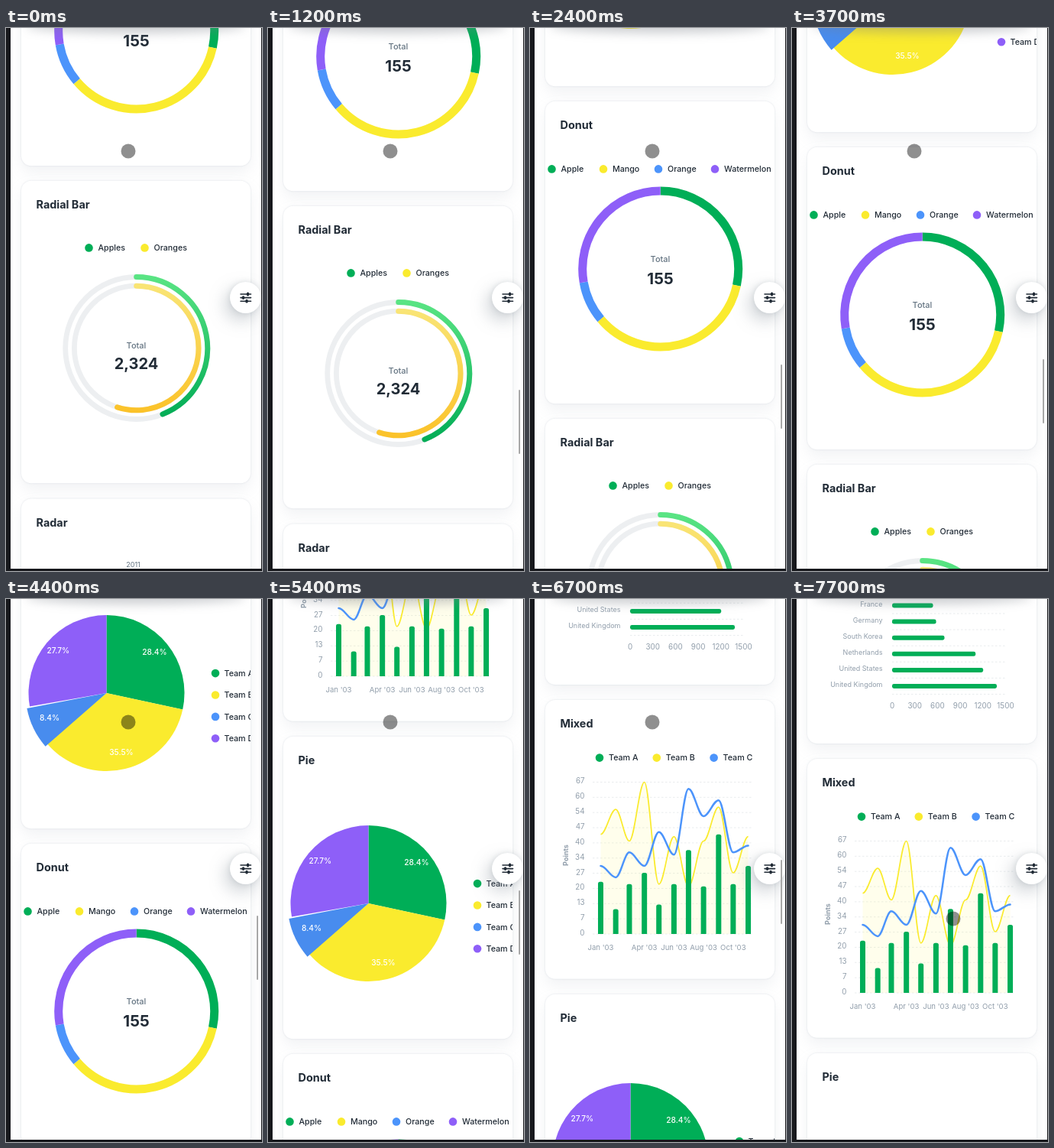
These frames come from a looping animation (335 by 710 pixels, 8000 ms). An HTML page:

```html
<!DOCTYPE html>
<html lang="en">
<head>
<meta charset="utf-8">
<title>Charts</title>
<style>
html, body { margin: 0; width: 100%; height: 100%; overflow: hidden; background: #17181c; }
#view { position: absolute; left: 6px; top: 0; width: 328px; height: 707px; overflow: hidden; background: #fff; }
#view > * { position: absolute; }
svg { display: block; }
text { font-family: Inter, "Open Sans", sans-serif; }
.card { fill: #fff; filter: drop-shadow(0 0 1px rgba(145,158,171,.28)) drop-shadow(0 9px 9px rgba(145,158,171,.12)); }
#head { left: 20px; top: -20px; width: 288px; height: 20px; border-radius: 50%; box-shadow: 0 7px 13px rgba(120,125,132,.36); }
#fab { left: 287px; top: 332px; width: 41px; height: 41px; border-radius: 50%; background: #fff;
  box-shadow: -6px 9px 22px rgba(120,130,142,.36), 0 0 7px rgba(120,130,142,.22); }
#bar { left: 322px; top: 0; width: 2px; height: 84px; border-radius: 1px; background: #a8a8a8; }
#dot { left: -6px; top: 0; width: 19px; height: 19px; margin: -9.5px; border-radius: 50%; background: rgba(0,0,0,.44); }
</style>
</head>
<body>
<div id="view">
  <svg width="328" height="707" viewBox="6 0 328 707">
    <defs>
      <linearGradient id="gg" gradientUnits="userSpaceOnUse" x1="0" y1="122" x2="0" y2="312">
        <stop stop-color="#5be584"/><stop offset="1" stop-color="#00ab55"/></linearGradient>
      <linearGradient id="gy" gradientUnits="userSpaceOnUse" x1="0" y1="134" x2="0" y2="302">
        <stop stop-color="#f9e576"/><stop offset="1" stop-color="#fbc229"/></linearGradient>
      <clipPath id="clip"><rect x="20" y="0" width="300" height="395.5"/></clipPath>
    </defs>
    <g id="page"></g>
  </svg>
  <div id="head"></div>
  <div id="fab"><svg width="41" height="41" viewBox="293 332 41 41" stroke="#212b36" stroke-width="1.6" stroke-linecap="round">
    <path d="M307 348H320.5M307 352.6H320.5M307 357.2H320.5"/>
    <path d="M316.5 347.3V348.7M310.5 351.9V353.3M315 356.5V357.9" stroke-width="3.4"/></svg></div>
  <div id="bar"></div>
  <div id="dot"></div>
</div>
<script>
const GREEN = '#00ae57', YELLOW = '#faeb2e', BLUE = '#4c94fb', VIOLET = '#8e5ff8';
const DARK = '#212b36', GREY = '#637381', PALE = '#919eab';
const colors = [GREEN, YELLOW, BLUE, VIOLET];
const $ = id => document.getElementById(id);

// y is the middle of the capitals
const text = (s, x, y, size, fill, weight = 400, anchor = 'middle') =>
  `<text x="${x}" y="${y + size * .36}" font-size="${size}" fill="${fill}" font-weight="${weight}" text-anchor="${anchor}">${s}</text>`;
const path = (d, stroke, width, extra = '') =>
  `<path d="${d}" fill="none" stroke="${stroke}" stroke-width="${width}" ${extra}/>`;
const dashed = (x0, x1, y) => path(`M${x0} ${y}H${x1}`, '#e4e7ea', .8, 'stroke-dasharray="2.5 2.5"');
const legend = (name, x, y, color, gap = 12) =>
  `<circle cx="${x}" cy="${y}" r="5.3" fill="${color}"/>` + text(name, x + gap, y, 10.7, DARK, 500, 'start');
const card = (y, title, body, h = 395.5) =>
  `<g transform="translate(0 ${y})"><rect class="card" x="20" width="300" height="${h}" rx="13"/>` +
  text(title, 39.5, 31.3, 14.4, DARK, 700, 'start') + body + '</g>';

const polar = (cx, cy, r, turn) => {
  const a = turn * 2 * Math.PI;
  return (cx + r * Math.sin(a)).toFixed(2) + ' ' + (cy - r * Math.cos(a)).toFixed(2);
};
const arc = (cx, cy, r, from, to) =>
  `M${polar(cx, cy, r, from)}A${r} ${r} 0 ${+(to - from > .5)} 1 ${polar(cx, cy, r, to)}`;
const shares = [44, 55, 13, 43].map(v => v / 155);
const startOf = i => shares.slice(0, i).reduce((a, b) => a + b, 0);

function barCard() {
  const rows = [['France', 540], ['Germany', 580], ['South Korea', 690], ['Netherlands', 1100],
    ['United States', 1200], ['United Kingdom', 1380]];
  let s = '';
  rows.forEach(([name, v], i) => {
    const y = 215 + i * 21.1;
    s += text(name, 118.5, y - 1.8, 9, PALE, 400, 'end') + dashed(131, 280, y + 10.5) +
      `<rect x="131" y="${y - 3}" width="${v * .0993}" height="6" rx="2.4" fill="${GREEN}"/>`;
  });
  for (let i = 0; i < 6; i++) s += text(i * 300, 131 + i * 29.7, 346.3, 9.9, PALE);
  return s;
}

function mixedCard() {
  const bars = [23, 11, 22, 27, 13, 22, 37, 21, 44, 22, 30];
  const area = [44, 55, 41, 67, 22, 43, 21, 41, 56, 27, 43];
  const line = [30, 25, 36, 30, 45, 35, 64, 52, 59, 36, 39];
  const days = [0, 31, 59, 90, 120, 151, 181, 212, 243, 273, 304];
  const base = 306, X = i => 92.5 + days[i] * .635, Y = v => base - v * 2.963;
  const curve = vals => vals.map((v, i) => {
    if (!i) return `M${X(0)} ${Y(v)}`;
    const k = (X(i) - X(i - 1)) * .35;
    return `C${X(i - 1) + k} ${Y(vals[i - 1])} ${X(i) - k} ${Y(v)} ${X(i)} ${Y(v)}`;
  }).join('');
  let s = ['Team A', 'Team B', 'Team C'].map((n, i) => legend(n, 91 + i * 74.8, 75.6, colors[i])).join('');
  for (let i = 0; i <= 10; i++) {
    const v = 67 - 6.7 * i;
    s += dashed(82, 290, Y(v)) + text(Math.round(v), 71.5, Y(v) - 1.6, 9.8, PALE, 400, 'end');
  }
  s += `<path d="${curve(area)}V${base}H92.5Z" fill="${YELLOW}" opacity=".09"/>` + path(curve(area), YELLOW, 1.7);
  bars.forEach((v, i) => {
    s += `<path d="M${X(i) - 3.5} ${base}V${Y(v) + 2.5}q0 -2.5 2.5 -2.5h2q2.5 0 2.5 2.5V${base}Z" fill="${GREEN}"/>`;
  });
  s += path(curve(line), BLUE, 2.5, 'stroke-linecap="round"');
  [['Jan', 0], ['Apr', 3], ['Jun', 5], ['Aug', 7], ['Oct', 9]].forEach(([m, i]) => {
    s += text(m + " '03", X(i), 323.8, 9.6, PALE);
  });
  return s + `<g transform="translate(47 203) rotate(-90)">${text('Points', 0, 0, 9.1, PALE, 700)}</g>`;
}

function pieCard() {
  const cx = 131.5, cy = 218.3;
  let s = '';
  [0, 1, 3, 2].forEach(i => {
    // the third slice is pulled out: larger and turned back a little
    const out = i === 2, a = startOf(i) - (out ? 1 / 360 : 0);
    s += `<path d="${arc(cx, cy, out ? 106 : 102, a, a + shares[i])}L${cx} ${cy}Z" fill="${out ? '#488cee' : colors[i]}"/>`;
  });
  [['28.4%', 194.5, 164.3], ['35.5%', 151, 295.3], ['8.4%', 57, 250.2], ['27.7%', 68.3, 163]]
    .forEach(([n, x, y]) => s += text(n, x, y, 10.2, '#fff', 500));
  [...'ABCD'].forEach((c, i) => s += legend('Team ' + c, 274, 192.4 + i * 28.4, colors[i], 11.5));
  return `<g clip-path="url(#clip)">${s}</g>`;
}

function donutCard() {
  let s = '';
  shares.forEach((p, i) => s += path(arc(170.7, 219.3, 102, startOf(i), startOf(i) + p), colors[i], 11));
  [['Apple', 28.5], ['Mango', 96], ['Orange', 168], ['Watermelon', 242]]
    .forEach(([n, x], i) => s += legend(n, x, 88.7, colors[i]));
  return s + text('Total', 170.5, 206.3, 11, GREY, 500) + text(155, 170.5, 232.2, 20.5, DARK, 700);
}

function radialCard() {
  const ring = (r, p, fill) => `<circle cx="170.7" cy="218.8" r="${r}" fill="none" stroke="#edeff1" stroke-width="6.8"/>` +
    path(arc(170.7, 218.8, r, 0, p), fill, 7, 'stroke-linecap="round"');
  return ring(93, .44, 'url(#gg)') + ring(81.3, .55, 'url(#gy)') +
    legend('Apples', 108.5, 87.7, GREEN) + legend('Oranges', 181.5, 87.7, YELLOW) +
    text('Total', 170.5, 215.7, 11, GREY, 500) + text('2,324', 170.5, 239, 20, DARK, 700);
}

$('page').innerHTML =
  card(-1430.5, 'Bar', barCard()) +
  card(-1015, 'Mixed', mixedCard(), 364.7) +
  card(-630.3, 'Pie', pieCard()) +
  card(-215.3, 'Donut', donutCard()) +
  card(199.7, 'Radial Bar', radialCard()) +
  card(615.5, 'Radar', text('2011', 166.5, 86.3, 9, GREY));

// keys are [time, value] pairs, straight in between
const along = (keys, t) => {
  const i = keys.findIndex(k => k[0] > t);
  if (i < 0) return keys[keys.length - 1][1];
  if (!i) return keys[0][1];
  const [t0, a] = keys[i - 1], [t1, b] = keys[i];
  return a + (b - a) * (t - t0) / (t1 - t0);
};
const scroll = [[1000, 0], [1100, 10], [1800, 168], [2300, 299], [2400, 311], [2600, 311], [2700, 332],
  [2800, 352], [2900, 361], [3600, 361], [3700, 371], [4400, 535], [5400, 810], [6100, 995],
  [6900, 1197], [7000, 1217], [7100, 1224]];
const barShown = [[1000, 0], [1100, 1], [3100, 1], [3400, 0], [3600, 0], [3700, 1], [7300, 1], [7600, 0]];

function draw() {
  const t = Math.floor(performance.now() % 8000 / 100) * 100; // ten pictures a second
  const y = Math.round(along(scroll, t));
  $('page').setAttribute('transform', `translate(0 ${y})`);
  $('bar').style.transform = `translateY(${Math.round(457 - (y - 168) * .1185)}px)`;
  $('bar').style.opacity = along(barShown, t);
  const p = along([[7300, 0], [7700, 1]], t), e = p * p * (3 - 2 * p);
  $('dot').style.transform = `translate(${159.5 + 51 * e}px, ${160.5 + 257 * e}px)`;
  requestAnimationFrame(draw);
}
draw();
</script>
</body>
</html>
```
